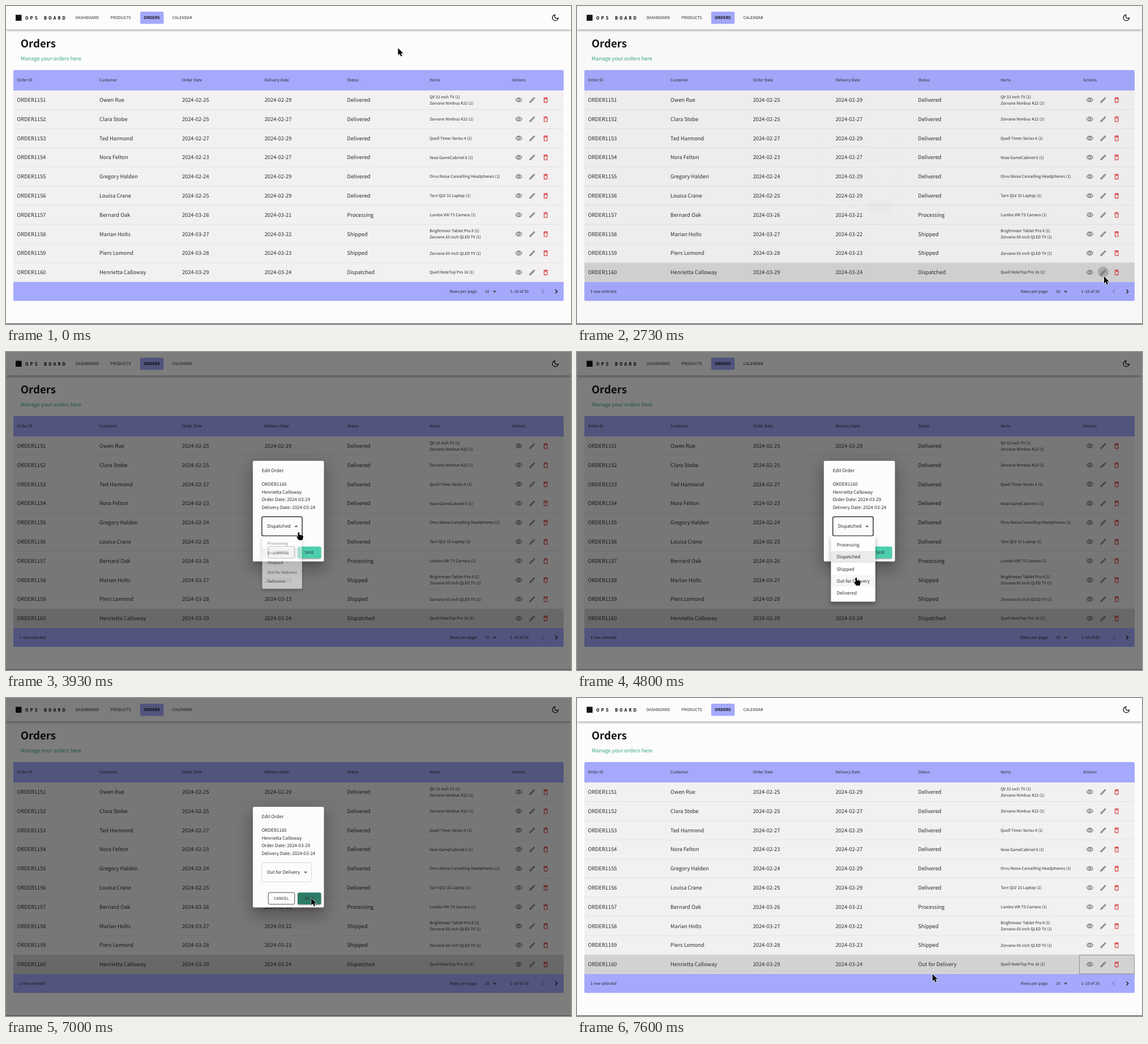
Write an HTML page that moves like this. It is 998x561 px and loops after 9340 ms.

```html
<!DOCTYPE html>
<html lang="en">
<head>
<meta charset="utf-8">
<title>Orders</title>
<style>
html, body { margin: 0; width: 100%; height: 100%; overflow: hidden; background: #fcfcfc; }
svg { display: block; width: 998px; height: 561px; }
text {
  font-family: "Noto Sans CJK SC", "Noto Sans CJK JP", "Noto Sans CJK", "Open Sans", sans-serif;
  text-rendering: geometricPrecision; white-space: pre;
}
.mono { font-family: "Noto Sans Mono", monospace; letter-spacing: 3.12px; }
</style>
</head>
<body>
<svg id="stage" viewBox="0 0 998 561"></svg>
<script>
const stage = document.getElementById('stage');
const LOOP = 9340, STEP = 200 / 3;
const PURPLE = '#a4a9fc', INK = '#141414', SOFT = '#2b2b2b', ROW = 33.8, TOP = 149;

const ORDERS = [
  ['Owen Rue', '02-25', '02-29', 'Delivered', 'QV 32 inch TV', 'Zorvane Nimbus K22'],
  ['Clara Stobe', '02-25', '02-27', 'Delivered', 'Zorvane Nimbus K22'],
  ['Ted Harmond', '02-27', '02-29', 'Delivered', 'Quell Timer Series 4'],
  ['Nora Felton', '02-23', '02-27', 'Delivered', 'Vexo GameCabinet 6'],
  ['Gregory Halden', '02-24', '02-29', 'Delivered', 'Orvu Noise Cancelling Headphones'],
  ['Louisa Crane', '02-25', '02-29', 'Delivered', 'Tarn QLV 15 Laptop'],
  ['Bernard Oak', '03-26', '03-21', 'Processing', 'Lumbo VIK T5 Camera'],
  ['Marian Holts', '03-27', '03-22', 'Shipped', 'Brightmoor Tablet Pro 8', 'Zorvane 65 inch QLED TV'],
  ['Piers Lomond', '03-28', '03-23', 'Shipped', 'Zorvane 65 inch QLED TV'],
  ['Henrietta Calloway', '03-29', '03-24', 'Dispatched', 'Quell NoteTop Pro 16']
];
const OPTIONS = ['Processing', 'Dispatched', 'Shipped', 'Out for Delivery', 'Delivered'];
const DETAILS = ['ORDER1160', ORDERS[9][0], 'Order Date: 2024-03-29', 'Delivery Date: 2024-03-24'];

const ICONS = {
  eye: 'M12 6c3.79 0 7.17 2.13 8.82 5.5C19.17 14.87 15.79 17 12 17s-7.17-2.13-8.82-5.5C4.83 8.13 8.21 6 12 6m0-2C7 4 2.73 7.11 1 11.5 2.73 15.89 7 19 12 19s9.27-3.11 11-7.5C21.27 7.11 17 4 12 4zm0 5a2.5 2.5 0 0 1 0 5a2.5 2.5 0 0 1 0-5m0-2a4.5 4.5 0 0 0 0 9a4.5 4.5 0 0 0 0-9z',
  pen: 'M14.06 9.02l.92.92L5.92 19H5v-.92l9.06-9.06M17.66 3c-.25 0-.51.1-.7.29l-1.83 1.83 3.75 3.75 1.83-1.83c.39-.39.39-1.02 0-1.41l-2.34-2.34c-.2-.2-.45-.29-.71-.29zm-3.6 3.19L3 17.25V21h3.75L17.81 9.94z',
  bin: 'M16 9v10H8V9h8m-1.5-6h-5l-1 1H5v2h14V4h-3.5zM18 7H6v12c0 1.1.9 2 2 2h8c1.1 0 2-.9 2-2V7z',
  moon: 'M9.37 5.51c-.18.64-.27 1.31-.27 1.99 0 4.08 3.32 7.4 7.4 7.4.68 0 1.35-.09 1.99-.27C17.45 17.19 14.93 19 12 19c-3.86 0-7-3.14-7-7 0-2.93 1.81-5.45 4.37-6.49zM12 3a9 9 0 1 0 9 9c0-.46-.04-.92-.1-1.36-.98 1.37-2.58 2.26-4.4 2.26-2.98 0-5.4-2.42-5.4-5.4 0-1.81.89-3.42 2.26-4.4-.44-.06-.9-.1-1.36-.1z',
  down: 'M7 10l5 5 5-5z',
  up: 'M7 14l5-5 5 5z',
  left: 'M15.41 7.41L14 6l-6 6 6 6 1.41-1.41L10.83 12z',
  right: 'M10 6L8.59 7.41 13.17 12l-4.58 4.59L10 18l6-6z'
};
const ARROW = 'M0 0V12.6L2.9 10 5 14.6 7.1 13.7 5 9.2H9z';
const HAND = 'M-1.3 1.2a1.3 1.3 0 0 1 2.6 0V4.6l5.3 1q1.6.4 1.4 2l-.6 3.4-1 3H.2L-3.4 8.8q-.4-1.6 1-1.2l1.1.8z';

// Pointer tip: time, x, y
const TRACK = [
  [0, 692, 74], [200, 901, 174], [333, 901, 174], [733, 930, 176], [800, 930, 176],
  [1000, 905, 415], [1200, 905, 415], [1600, 946, 448], [2067, 931, 477], [2733, 931, 477],
  [2867, 932, 478], [3000, 932, 478], [3200, 535, 340], [3400, 535, 340], [3600, 517, 318],
  [4333, 517, 318], [4600, 500, 418], [4800, 493, 398], [5000, 490, 400], [5600, 490, 400],
  [6200, 531, 342], [6467, 540, 353], [7133, 539, 353], [7600, 628, 487]
];

const clamp = v => Math.max(0, Math.min(1, v));
const ease = v => v * v * (3 - 2 * v);
const ramp = (t, start, length) => ease(clamp((t - start) / length));
const mix = (a, b, k) => a + (b - a) * k;

const text = (x, y, size, str, fill = SOFT, more = '') =>
  `<text x="${x}" y="${y + size * .34}" font-size="${size * .895}" fill="${fill}" ${more}>${str}</text>`;
const rect = (x, y, w, h, fill, more = '') =>
  `<rect x="${x}" y="${y}" width="${w}" height="${h}" fill="${fill}" ${more}/>`;
const icon = (name, x, y, size, fill) =>
  `<path d="${ICONS[name]}" fill="${fill}" transform="translate(${x - size / 2} ${y - size / 2}) scale(${size / 24})"/>`;
const group = (opacity, body, more = '') => opacity > 0 ? `<g opacity="${opacity}" ${more}>${body}</g>` : '';

// Each layer: offset, blur, spread, alpha
const shadow = (x, y, w, h, layers) => layers.map(([dy, blur, grow, a]) =>
  rect(x - grow, y + dy - grow, w + 2 * grow, h + 2 * grow, '#000',
    `rx="2.6" opacity="${a}" style="filter:blur(${blur / 2}px)"`)).join('');
const RAISED = [[2, 2, -1.3, .2], [1.3, 1.3, 0, .14], [.7, 3.3, 0, .12]];
const NAV = [[1.3, 2.6, -.65, .2], [2.6, 3.3, 0, .14], [.65, 6.5, 0, .12]];
const MENU = [[3.3, 3.3, -2, .2], [5.2, 6.5, .65, .14], [2, 9, 1.3, .12]];
const MODAL = [[7, 10, -4.5, .2], [15.6, 25, 2, .14], [5.9, 30, 5.2, .12]];

function navbar() {
  return shadow(0, 0, 998, 41.5, NAV) + rect(0, 0, 998, 41.5, '#fcfcfc') +
    rect(17, 15.5, 10.5, 10.5, INK) +
    `<text class="mono" x="34.3" y="24" font-size="8.45" font-weight="700" fill="${INK}">OPS BOARD</text>` +
    rect(237, 10, 41.5, 21.5, PURPLE, 'rx="2.6"') +
    text(122.7, 20.3, 7.8, 'DASHBOARD') + text(184.6, 20.3, 7.8, 'PRODUCTS') +
    text(243.3, 20.3, 7.8, 'ORDERS', INK, 'font-weight="700"') + text(293.8, 20.3, 7.8, 'CALENDAR') +
    icon('moon', 970.3, 20.7, 15.6, INK);
}

function orderRow(order, i, saved) {
  const y = TOP + ROW * (i + .5) - .4;
  const [name, placed, due, status, ...items] = order;
  const cells = ['ORDER' + (1151 + i), name, '2024-' + placed, '2024-' + due,
    i === 9 && saved ? 'Out for Delivery' : status];
  return rect(13, TOP + ROW * (i + 1) - .7, 972, .7, '#dcdcdc') +
    cells.map((c, k) => text(19.3 + 145.8 * k, y, 10.4, c)).join('') +
    items.map((s, k) => text(748.2, y + 10.8 * (k - (items.length - 1) / 2), 7.8, s + ' (1)')).join('') +
    icon('eye', 905.8, y + .3, 13, '#666') + icon('pen', 929.5, y + .3, 13, '#666') +
    icon('bin', 953.2, y + .3, 13, '#d32f2f');
}

function page(t) {
  const picked = t > 2590, saved = t > 7010;
  const ring = t > 3130 ? 0 : t > 2460 ? .18 : t > 1930 ? .04 : 0;
  const heads = ['Order ID', 'Customer', 'Order Date', 'Delivery Date', 'Status', 'Items', 'Actions'];
  return rect(0, 0, 998, 561, '#fcfcfc') + navbar() +
    text(25.7, 66.4, 20.8, 'Orders', INK, 'font-weight="700"') +
    text(25.8, 92.7, 10.4, 'Manage your orders here', '#3da58a') +
    rect(13, 113, 972, 407.3, PURPLE, 'rx="2.6"') +
    heads.map((h, k) => text(19.3 + 145.8 * k, 130.5, 7.8, h)).join('') +
    rect(13, TOP, 972, ROW * 10, '#f2f0f0') +
    (picked ? rect(13, TOP + ROW * 9, 972, ROW, '#d3d2d2') : '') +
    `<circle cx="929.5" cy="469.4" r="9.7" opacity="${ring}"/>` +
    ORDERS.map((o, i) => orderRow(o, i, saved)).join('') +
    (saved ? rect(887.5, 453.4, 97, 33.2, 'none', 'stroke="#777" stroke-width=".7"') : '') +
    (picked ? text(23.4, 503.5, 7.8, '1 row selected') : '') +
    text(783.8, 503.5, 7.8, 'Rows per page:') + text(846, 503.5, 7.8, '10') +
    icon('down', 863, 503.8, 15.6, '#444') + text(890.4, 503.5, 7.8, '1–10 of 30') +
    icon('left', 948.3, 503.7, 15.6, '#7a7cb5') + icon('right', 972, 503.7, 15.6, INK);
}

function dialog(t, x, y, w, lines, value, boxWidth) {
  const h = 124 + 13.4 * lines.length;
  const boxY = y + 45 + 13.4 * lines.length, btnY = y + h - 26.4, right = x + w;
  const focus = t > 3860 && t < 6700, hover = t > 3530 && t < 3860;
  const open = t > 3860 && t < 5400;
  const k = ramp(t, 6230, 240);
  const save = `rgb(${mix(76, 46, k)},${mix(206, 124, k)},${mix(172, 103, k)})`;
  const border = focus ? 'stroke="#141414" stroke-width="1.3"' :
    `stroke="${hover ? '#222' : '#c4c4c4'}" stroke-width=".7"`;
  return shadow(x, y, w, h, MODAL) + rect(x, y, w, h, '#fcfcfc', 'rx="2.6"') +
    text(x + 15.7, y + 17, 9.1, 'Edit Order') +
    lines.map((s, i) => text(x + 15.7, y + 41.3 + 13.4 * i, 8.95, s)).join('') +
    rect(x + 15.9, boxY, boxWidth, 33.8, 'none', 'rx="2.6" ' + border) +
    text(x + 24.9, boxY + 16.7, 8.95, value) +
    icon(open ? 'up' : 'down', x + 5.2 + boxWidth, boxY + 16.9, 15.6, '#666') +
    rect(right - 98.3, btnY, 46.5, 20.7, 'none', 'rx="2.6" stroke="#222" stroke-width=".8"') +
    text(right - 88.2, btnY + 10.2, 7.8, 'CANCEL') +
    shadow(right - 46.5, btnY, 41.5, 20.9, RAISED) +
    rect(right - 46.5, btnY, 41.5, 20.9, save, 'rx="2.6"') +
    text(right - 34.2, btnY + 10.2, 7.8, 'SAVE', '#22332e');
}

function modal(t) {
  const shown = Math.min(ramp(t, 2715, 180), 1 - ramp(t, 7010, 195));
  if (shown <= 0) return '';
  const chosen = t > 5390;
  const body = t > 7010 ?
    dialog(t, 447, 205, 104, ['Order Date: ', 'Delivery Date: '], '', 29.5) :
    dialog(t, 436, 192, 125.6, DETAILS, chosen ? OPTIONS[3] : OPTIONS[1], chosen ? 88 : 71.3);
  return rect(0, 0, 998, 561, '#000', `opacity="${shown / 2}"`) + group(shown, body);
}

function menu(t, py) {
  const grown = ramp(t, 3800, 240), shown = Math.min(grown, 1 - ramp(t, 5400, 200));
  const x = 448.5, y = 324.8, w = 78.5, h = 115.8;
  const over = t > 4333 ? Math.floor((py - 330) / 21.05) : -1;
  const rows = OPTIONS.map((s, i) => {
    const shade = i === 1 ? .08 : i === over ? .035 : 0;
    return rect(x, 330 + 21.05 * i, w, 21.05, '#000', `opacity="${shade}"`) +
      text(458.8, 340.4 + 21.05 * i, 8.95, s);
  }).join('');
  const sx = mix(.75, 1, grown), sy = sx * sx, cx = x + w / 2, cy = y;
  return group(shown, shadow(x, y, w, h, MENU) + rect(x, y, w, h, '#fff', 'rx="2.6"') + rows,
    `transform="translate(${cx} ${cy}) scale(${sx} ${sy}) translate(${-cx} ${-cy})"`);
}

function pointerAt(t) {
  const i = TRACK.findIndex(p => p[0] > t);
  if (i < 0) return TRACK[TRACK.length - 1].slice(1);
  const [t0, x0, y0] = TRACK[i - 1], [t1, x1, y1] = TRACK[i];
  const k = (t - t0) / (t1 - t0);
  return [mix(x0, x1, k), mix(y0, y1, k)];
}

function pointer(t, x, y) {
  const inBox = x > 452 && x < 540 && y > 290 && y < 325;
  const hand = t > 3460 && t < 6200 && (inBox || t < 5600);
  return `<path d="${hand ? HAND : ARROW}" transform="translate(${x} ${y})" fill="#000" stroke="#fff"
    stroke-width="1.2" stroke-linejoin="round" paint-order="stroke"/>`;
}

let last = -1;
function frame() {
  const step = Math.floor((performance.now() % LOOP) / STEP + .06);
  if (step !== last) {
    last = step;
    const t = step * STEP + .5, [x, y] = pointerAt(t);
    stage.innerHTML = page(t) + modal(t) + menu(t, y) + rect(0, 560, 998, 1, '#444') + pointer(t, x, y);
  }
  requestAnimationFrame(frame);
}
frame();
</script>
</body>
</html>
```
